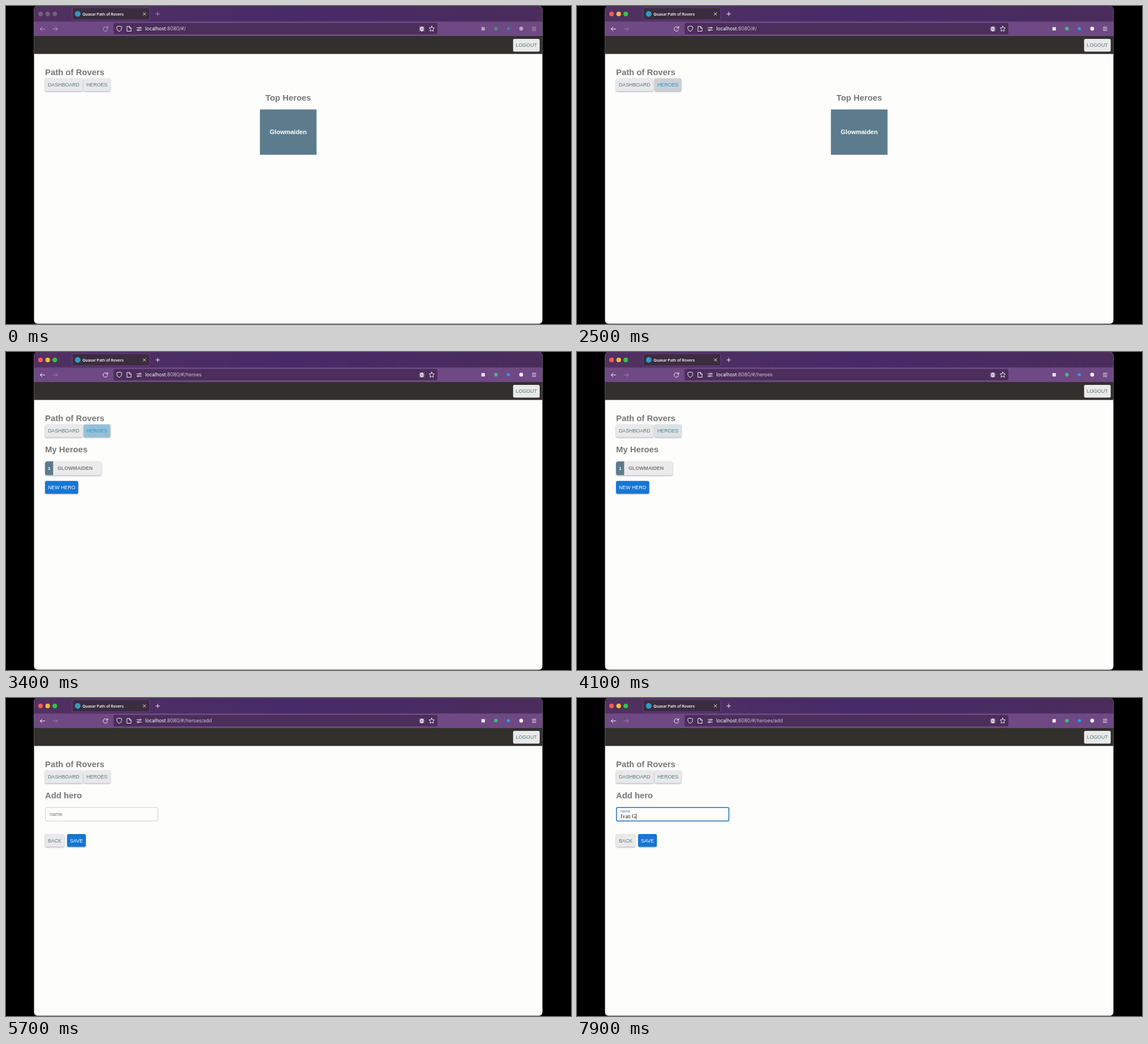
An HTML page for the animation above (8000 ms loop, 998 px wide and 561 px high).

```html
<!DOCTYPE html>
<html lang="en">
<head>
<meta charset="utf-8">
<title>Hero list</title>
<style>
html, body { margin: 0; width: 100%; height: 100%; overflow: hidden; background: #000; }
#stage { position: relative; width: 998px; height: 561px; overflow: hidden; }
svg { position: absolute; left: 0; top: 0; width: 998px; height: 561px; font: 8.8px "Liberation Sans", Arial, sans-serif; }
.ui { font-family: Inter, Roboto, sans-serif; }
.line { fill: none; stroke: #f4edf7; stroke-width: 1; stroke-linecap: round; stroke-linejoin: round; }
.title { font-size: 14.85px; font-weight: bold; fill: #787878; }
.raised { filter: drop-shadow(0 1px .8px rgba(50,40,80,.42)); }
.btn rect { fill: #e9e9e9; }
.btn text { fill: #5a7b78; }
.blue rect { fill: #1676d2; }
.blue text { fill: #fff; }
.bold { font-weight: bold; }
.field { fill: none; stroke: #c4c4c4; }
.label { font-size: 9px; fill: #777; transform-origin: 77px 205px; }
.entry { position: absolute; left: 77px; top: 203.5px; height: 10.5px; line-height: 10.5px; font-family: "Liberation Serif", "Noto Serif", serif; font-size: 9.8px; color: #222; white-space: pre; }
.caret { position: absolute; left: 100%; top: 0; width: 1px; height: 10.5px; background: #333; }

/* One shared 8 s clock; 1.25% is 100 ms. */
.lights, .wake, .forward, .home, .list, .add, .path, .heroes rect, .heroes text, .new rect, .field, .label, .caret { animation: 8s linear infinite both; }
.lights { animation-name: lights; }
.wake { animation-name: wake; }
.forward { animation-name: forward; }
.home, .list, .add, .path, .caret { animation-timing-function: step-end; }
.home { animation-name: home; }
.list { animation-name: list; }
.add { animation-name: add; }
.path { animation-name: path; }
.heroes rect { animation-name: heroes-back; }
.heroes text { animation-name: heroes-text; }
.new rect { animation-name: new; }
.field { animation-name: field; }
.label { animation-name: label; }
.caret { animation-name: caret; }
@keyframes lights { 0%, 8.74% { opacity: 0; } 8.75%, 100% { opacity: 1; } }
@keyframes wake { 0%, 8.74% { opacity: .55; } 8.75%, 100% { opacity: 1; } }
@keyframes forward { 0%, 8.74% { opacity: .55; } 8.75%, 100% { opacity: .32; } }
@keyframes home { 0% { opacity: 1; } 40%, 100% { opacity: 0; } }
@keyframes list { 0% { opacity: 0; } 40% { opacity: 1; } 68.75%, 100% { opacity: 0; } }
@keyframes add { 0% { opacity: 0; } 68.75%, 100% { opacity: 1; } }
@keyframes path { 0% { opacity: 0; } 40%, 100% { opacity: 1; } }
@keyframes heroes-back {
  0%, 26.25% { fill: #e9e9e9; }
  30%, 40% { fill: #cad1d5; }
  42.5%, 43.75% { fill: #97c0d6; }
  46.25%, 48.75% { fill: #c4d0d7; }
  52.5%, 100% { fill: #e9e9e9; }
}
@keyframes heroes-text {
  0%, 26.25% { fill: #5a7b78; }
  30%, 40% { fill: #2a91cf; }
  42.5%, 48.75% { fill: #1c99df; }
  52.5%, 100% { fill: #5a7b78; }
}
@keyframes new { 0%, 53.75% { fill: #1676d2; } 57.5%, 100% { fill: #347dc0; } }
@keyframes field {
  0%, 78.75% { stroke: #c4c4c4; stroke-width: .8px; }
  82.4% { stroke: #555; stroke-width: .8px; }
  82.5% { stroke: #5f87b0; stroke-width: 1.3px; }
  83.75% { stroke: #3d82c8; stroke-width: 1.3px; }
  87.5%, 100% { stroke: #1b6fbe; stroke-width: 1.5px; }
}
@keyframes label {
  0%, 82.5% { transform: none; fill: #777; }
  83.75% { transform: translateY(-3px) scale(.84); fill: #4989c6; }
  87.5%, 100% { transform: translateY(-5px) scale(.75); fill: #3b85bd; }
}
@keyframes caret { 0% { opacity: 0; } 82.5%, 100% { opacity: 1; } }
</style>
</head>
<body>
<div id="stage">
  <svg viewBox="0 0 998 561">
    <defs>
      <linearGradient id="purple">
        <stop stop-color="#513160"/><stop offset=".5" stop-color="#472a68"/><stop offset="1" stop-color="#4a2d5b"/>
      </linearGradient>
      <clipPath id="frame"><rect x="49.5" width="898" height="560.4" rx="6"/></clipPath>
      <clipPath id="item"><rect x="69" y="193" width="100" height="24.5" rx="4"/></clipPath>
    </defs>

    <g clip-path="url(#frame)">
      <rect x="49" width="900" height="561" fill="#fdfdfc"/>
      <rect x="49" y="52" width="900" height="32.6" fill="#31302d"/>
      <rect x="49" y="26" width="900" height="27" fill="#6f4983"/>
      <rect x="49" width="900" height="27.3" fill="url(#purple)"/>
    </g>

    <g class="ui">
      <g fill="#75607f"><circle cx="61" cy="14" r="4"/><circle cx="73.6" cy="14" r="4"/><circle cx="86.2" cy="14" r="4"/></g>
      <g class="lights">
        <circle cx="61" cy="14" r="4" fill="#fb5d55"/>
        <circle cx="73.6" cy="14" r="4" fill="#fabd2f"/>
        <circle cx="86.2" cy="14" r="4" fill="#2bc840"/>
      </g>

      <rect x="117" y="3" width="137" height="21.5" rx="2.5" fill="#3b2c3f" stroke="#77479f" stroke-width=".8"/>
      <circle cx="126.7" cy="14" r="5" fill="#329ac5"/>
      <text x="135" y="16.6" font-size="6.8" font-weight="600" fill="#f8f4fa">Quasar Path of Rovers</text>
      <path class="line" d="M242.2 11.7l4.6 4.6m0-4.6l-4.6 4.6"/>

      <rect x="190" y="30" width="572" height="20" rx="2.5" fill="#4b2e5b"/>
      <g class="line">
        <path d="M200 35.5q2.5 0 4.2 1v3.2q0 3.2-4.2 5.2q-4.2-2-4.2-5.2v-3.2q1.7-1 4.2-1z"/>
        <path d="M214 36h4l3 3v5.5h-7zM218 36v3h3"/>
        <path d="M231 38.5h4m3 0h1.5M231 42.5h1.5m3 0h4"/>
        <circle cx="236.5" cy="38.5" r="1.4"/><circle cx="233.8" cy="42.5" r="1.4"/>
        <path d="M752 35.3l1.4 3.1 3.3.4-2.4 2.3.6 3.4-2.9-1.7-2.9 1.7.6-3.4-2.4-2.3 3.3-.4z"/>
        <path d="M730.5 37l2 1.3m6-1.3l-2 1.3M730 40.5h9M730.5 44l2-1.3m6 1.3l-2-1.3"/>
      </g>
      <ellipse cx="734.5" cy="40.5" rx="2.8" ry="4.2" fill="#f4edf7"/>
      <path d="M733 39.3h3m-3 2.5h3" stroke="#4b2e5b" stroke-width=".9"/>

      <text x="246" y="43.2" font-size="8.5" fill="#cfc1d6"><tspan fill="#fff">localhost</tspan>:8080/#/</text>
      <text class="path" x="318" y="43.2" font-size="8.5" fill="#cfc1d6">heroes</text>
      <text class="add" x="345.2" y="43.2" font-size="8.5" fill="#cfc1d6">/add</text>

      <g class="wake">
        <g class="line">
          <path d="M268 10.7v6.6M264.7 14h6.6"/>
          <path d="M68.5 40.5h-8.2m3.4-3.4l-3.4 3.4 3.4 3.4"/>
          <path d="M179.2 38.7a4 4 0 1 0 .3 2.8M179.8 36v3h-3"/>
          <path d="M929.5 37.5h6.5m-6.5 2.8h6.5m-6.5 2.8h6.5"/>
        </g>
        <rect x="839.8" y="37.2" width="6" height="6" fill="#efe7f3"/>
        <circle cx="865.3" cy="40" r="3.2" fill="#42b883"/>
        <circle cx="887.3" cy="40" r="2.8" fill="#2e9df0"/>
        <circle cx="910" cy="40" r="3.4" fill="#f2edf4"/>
      </g>
      <path class="line forward" d="M82.8 40.5h8.2m-3.4-3.4l3.4 3.4-3.4 3.4"/>
    </g>

    <g class="btn"><rect class="raised" x="895.7" y="58" width="47" height="22.5" rx="2.5"/><text x="900.5" y="72.3">LOGOUT</text></g>
    <text class="title" x="69" y="122.2">Path of Rovers</text>
    <g class="btn"><rect class="raised" x="69" y="127.8" width="66" height="22.5" rx="2.5"/><text x="74" y="142.2">DASHBOARD</text></g>
    <g class="btn heroes"><rect class="raised" x="137" y="127.8" width="47.2" height="22.5" rx="2.5"/><text x="142" y="142.2">HEROES</text></g>

    <g class="home">
      <text class="title" x="498.5" y="167" text-anchor="middle">Top Heroes</text>
      <rect x="448.5" y="182.5" width="100" height="80" fill="#5c7c8d"/>
      <text class="bold" x="498.5" y="226.4" font-size="11" text-anchor="middle" fill="#fff">Glowmaiden</text>
    </g>

    <g class="list">
      <text class="title" x="69" y="177">My Heroes</text>
      <rect class="raised" x="69" y="193" width="100" height="24.5" rx="4" fill="#ebebeb"/>
      <rect x="69" y="193" width="14.3" height="24.5" fill="#5c7b8c" clip-path="url(#item)"/>
      <text class="bold" x="76.2" y="208.1" font-size="8" text-anchor="middle" fill="#fff">1</text>
      <text class="bold" x="91" y="208.4" fill="#7c7c7c">GLOWMAIDEN</text>
      <g class="btn blue new"><rect class="raised" x="69" y="227.5" width="58.5" height="22.5" rx="2.5"/><text x="74" y="242.1">NEW HERO</text></g>
    </g>

    <g class="add">
      <text class="title" x="69" y="177">Add hero</text>
      <rect class="field" x="69.7" y="193.2" width="198.6" height="23.7" rx="2.2"/>
      <text class="label" x="77" y="208">name</text>
      <g class="btn"><rect class="raised" x="69" y="240" width="34" height="22.5" rx="2.5"/><text x="74" y="254.6">BACK</text></g>
      <g class="btn blue"><rect class="raised" x="108" y="240" width="33" height="22.5" rx="2.5"/><text x="113" y="254.6">SAVE</text></g>
    </g>
  </svg>
  <div class="entry"><span id="typed"></span><i class="caret"></i></div>
</div>
<script>
const loop = 8000;
const entry = "Ivan G";
const firstKey = 7100, keyGap = 150;
const typed = document.getElementById("typed");
const start = performance.now();

// Keep the CSS animations and the typing on the same clock.
document.getAnimations().forEach(a => { a.startTime = start; });

function draw(now) {
  const t = Math.max(0, now - start) % loop;
  const count = Math.max(0, Math.floor((t - firstKey) / keyGap) + 1);
  typed.textContent = entry.slice(0, count);
  requestAnimationFrame(draw);
}
requestAnimationFrame(draw);
</script>
</body>
</html>
```
